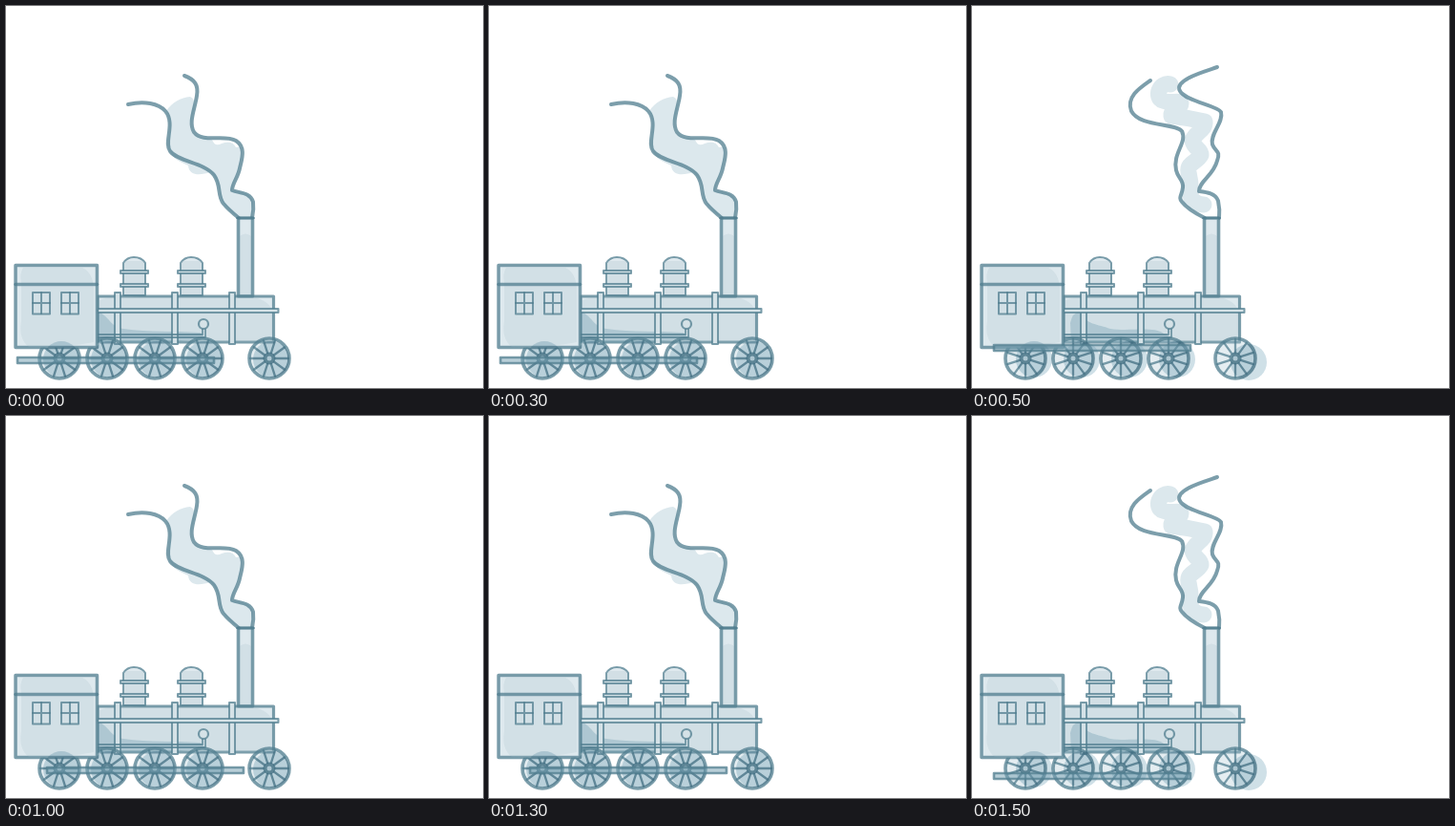
An HTML page with a canvas that plays this animation: 500x400 px, repeating every 2 s.

```html
<!DOCTYPE html>
<html lang="en">
<head>
<meta charset="utf-8">
<title>Steam train</title>
<style>
  html, body { margin: 0; width: 100%; height: 100%; overflow: hidden; background: #fff; }
  canvas { display: block; }
</style>
</head>
<body>
<canvas id="stage" width="500" height="400"></canvas>
<script>
const ctx = document.getElementById('stage').getContext('2d');
const INK = 'rgba(80,126,143,.75)';
const BASE = 'rgba(165,195,207,.36)';
const WASH = 'rgba(158,184,194,.2)';
const DEEP = 'rgba(103,151,169,.33)';
const TRIM = '#d5e2e7';
const SMOKE = '#dce8ed';
const WHEELS = [56, 106, 156, 206, 276];
const RODS = [[12, 367], [23, 354], [43, 367], [23, 373]];

const SMOKE_LINES = [
  ['M128 103 C145 99 160 102 167 110 C178 123 165 143 172 152 C180 163 208 164 218 177 C226 188 221 198 228 207 Q233 213 244 222',
   'M187 73 C198 77 202 83 200 94 C198 108 191 122 197 132 C206 144 229 134 241 141 C252 148 247 161 245 170 C243 180 237 186 237 193 C245 196 256 195 259 205 Q260 213 258 222'],
  ['M187 78 C177 85 161 95 167 110 C176 127 212 122 220 131 C226 143 210 154 214 172 C216 181 222 182 221 190 C220 199 216 200 220 205 Q226 213 244 222',
   'M257 64 C246 68 211 77 218 89 C224 100 257 104 261 111 C264 122 249 134 252 145 C255 153 261 151 257 162 C253 178 238 183 238 194 C246 195 255 196 258 204 Q260 213 259 222']
].map(pair => pair.map(d => new Path2D(d)));

const SMOKE_FILL = new Path2D('M168 110 C174 101 183 96 193 95 Q199 97 197 108 C194 119 190 128 197 134 C203 140 210 137 216 140 Q219 148 226 144 Q237 140 241 148 Q247 146 247 151 C248 169 238 181 237 193 C247 195 257 195 259 206 L258 222 H244 C228 211 225 204 224 193 C222 182 218 178 214 174 C205 177 192 179 191 167 C182 163 175 160 171 151 C168 141 176 126 168 110Z');
const SMOKE_BRUSH = new Path2D('M208 82 C196 79 191 96 200 99 C208 103 217 98 219 102 C219 108 208 108 209 115 Q226 117 244 121 C245 130 234 132 231 141 C233 150 240 149 240 156 C236 164 225 164 227 174 C231 190 228 196 230 202 Q236 208 243 208');
const CAB_WASH = new Path2D('M18 274 H80 Q91 279 92 296 V352 Q55 359 24 357 Q13 349 16 330 V290 Q14 280 18 274Z');
const BOILER_WASH = new Path2D('M96 309 Q110 302 140 305 H260 Q277 309 279 320 V342 Q279 352 259 352 H96Z');
const CHIMNEY_WASH = new Path2D('M245 304 V241 Q251 236 257 241 V304Z');
const SHADE = [
  'M96 320 C108 324 109 336 123 338 C151 342 176 340 203 342 Q211 345 203 348 Q180 354 96 352Z',
  'M103 332 Q105 321 113 320 C119 334 132 333 145 338 C165 341 191 335 201 343 Q211 347 207 352 H104Z'
].map(d => new Path2D(d));

function paint(path, fill, width) {
  if (fill) { ctx.fillStyle = fill; ctx.fill(path); }
  if (width) { ctx.strokeStyle = INK; ctx.lineWidth = width; ctx.stroke(path); }
}
function box(x, y, w, h, fill, width) {
  const path = new Path2D();
  path.rect(x, y, w, h);
  paint(path, fill, width);
}
function disc(x, y, r, fill, width) {
  const path = new Path2D();
  path.arc(x, y, r, 0, Math.PI * 2);
  paint(path, fill, width);
}
const line = (d, width) => paint(new Path2D(d), null, width);

function drawSmoke(puff) {
  if (puff) {
    ctx.strokeStyle = SMOKE;
    ctx.lineWidth = 17;
    ctx.stroke(SMOKE_BRUSH);
  } else {
    paint(SMOKE_FILL, SMOKE);
  }
  SMOKE_LINES[puff].forEach(path => paint(path, null, 4));
}

function drawWheel(x, step) {
  const y = 369;
  disc(x, y, 21, 'rgba(165,195,207,.3)', 3.6);
  const spokes = new Path2D();
  for (let i = 0; i < 10; i++) {
    const angle = i * Math.PI / 5 + step * Math.PI / 2;
    const c = Math.cos(angle), s = Math.sin(angle);
    spokes.moveTo(x + c * 6, y + s * 6);
    spokes.lineTo(x + c * 20, y + s * 20);
  }
  paint(spokes, null, 2.3);
  disc(x, y, 4.5, TRIM, 4);
}

// Loose colour patches that slide to the right of the wheels
function drawWheelWash(shifted) {
  ctx.globalCompositeOperation = 'multiply';
  for (const x of WHEELS) {
    const front = x === WHEELS.at(-1);
    const dx = shifted ? (front ? 14 : 9) : 2;
    disc(x + dx, shifted && front ? 373 : 370, 19, '#cfe0e7');
  }
  ctx.globalCompositeOperation = 'source-over';
}

function drawDome(x) {
  paint(new Path2D(`M${x - 11} 303 V269 Q${x - 7} 263 ${x} 263 Q${x + 8} 263 ${x + 12} 269 V303Z`), BASE, 2);
  box(x - 11, 267, 22, 36, WASH);
  for (const y of [277, 291]) box(x - 14, y, 29, 3, TRIM, 2);
}

function drawBoiler(step) {
  box(243.5, 222, 15, 82, BASE, 3.6);
  paint(CHIMNEY_WASH, WASH);
  line('M242 222 H260', 2);

  drawDome(134);
  drawDome(194);
  box(96, 304, 184.5, 48, BASE, 3.2);
  paint(BOILER_WASH, WASH);
  paint(SHADE[step % 2], DEEP);
  for (const x of [114, 174, 234]) box(x, 300, 6, 54, TRIM, 2);
  box(96, 317, 189.5, 4, TRIM, 2);
  line('M96 344 H206 V338 M96 347 H209 V338', 1.8);
  disc(207, 333, 5, TRIM, 2.2);
}

function drawCab() {
  box(10, 271.5, 85.5, 86, '#fff');
  box(10, 271.5, 85.5, 86, BASE, 3.5);
  paint(CAB_WASH, WASH);
  line('M10 291.5 H95.5', 3.5);
  for (const x of [28, 58]) {
    box(x, 300, 18, 22.5, null, 2);
    line(`M${x + 9} 300 V322 M${x} 311 H${x + 18}`, 2);
  }
}

function draw(step) {
  ctx.clearRect(0, 0, 500, 400);
  ctx.lineCap = ctx.lineJoin = 'round';
  drawSmoke(step % 2);
  drawBoiler(step);
  WHEELS.forEach(x => drawWheel(x, step));
  drawCab();
  drawWheelWash(step % 2);
  const [x, y] = RODS[step];
  box(x, y + 1, 206, 6, 'rgba(117,160,177,.5)', 2.6);
}

let shown = -1;
function tick(now) {
  const step = Math.floor(now % 2000 / 500);
  if (step !== shown) draw(shown = step);
  requestAnimationFrame(tick);
}
tick(performance.now());
</script>
</body>
</html>
```
